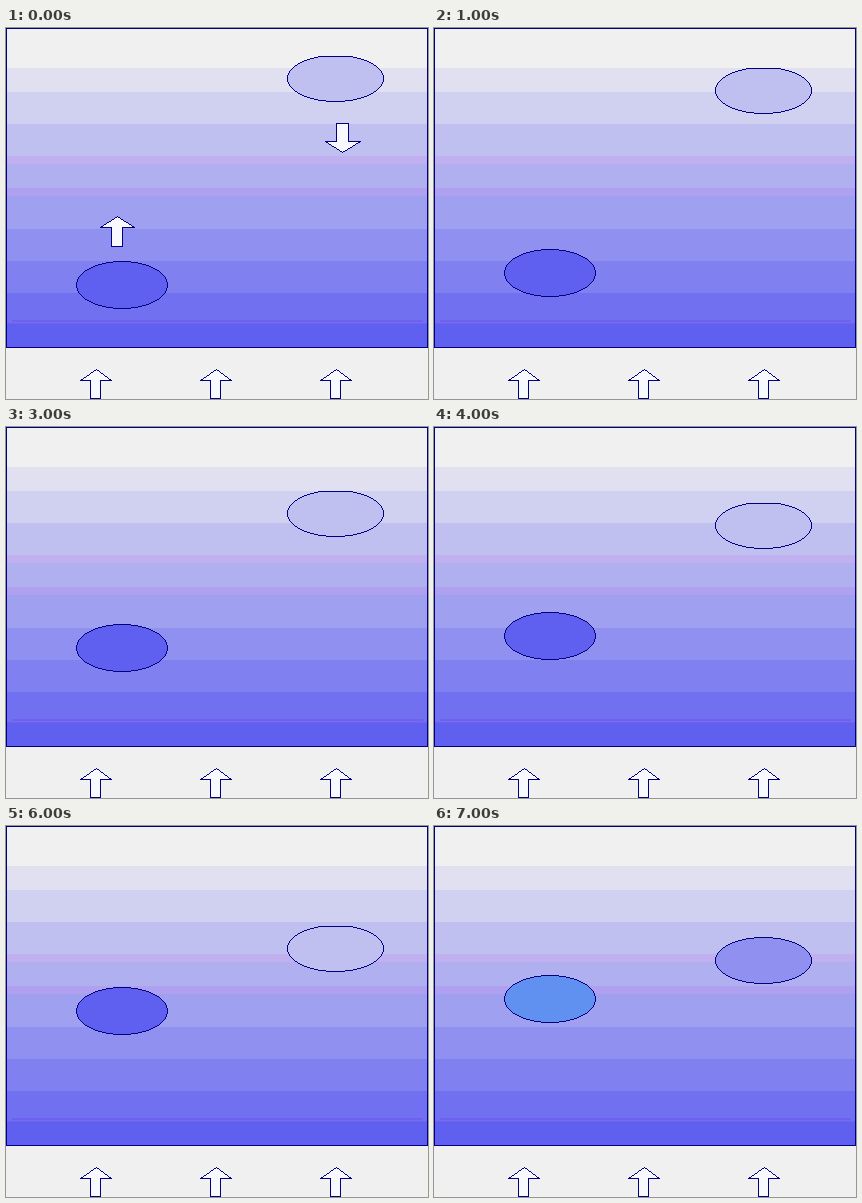
These frames come from a looping animation (422x371 px, 8000 ms). An HTML page with a canvas:

```html
<!DOCTYPE html>
<html lang="en">
<head>
<meta charset="utf-8">
<title>Rising and sinking parcels</title>
<style>
html, body { margin: 0; width: 100%; height: 100%; overflow: hidden; background: #f0f0f0; }
canvas { display: block; }
</style>
</head>
<body>
<canvas id="stage" width="422" height="371"></canvas>
<script>
const ctx = document.getElementById('stage').getContext('2d');
const LOOP = 8000, STEP = 1000, RISE = 12;
const INK = '#000080', PAPER = '#f0f0f0', WHITE = '#f8f8ff';

// Top edge and colour of each layer
const layers = [
  [0, PAPER], [40, '#e0e0f0'], [64, '#d0d0f0'], [96, '#c0c0f0'],
  [128, '#c0b0f0'], [136, '#b0b0f0'], [160, '#b0a0f0'], [168, '#a0a0f0'],
  [201, '#9090f0'], [233, '#8080f0'], [265, '#7070f0'], [296, '#6060f0']
];

function rect(x, y, w, h, color) {
  ctx.fillStyle = color;
  ctx.fillRect(x, y, w, h);
}

// Crisp one-pixel line
function line(x0, y0, x1, y1) {
  const n = Math.max(Math.abs(x1 - x0), Math.abs(y1 - y0));
  for (let i = 0; i <= n; i++) {
    rect(Math.round(x0 + (x1 - x0) * i / n), Math.round(y0 + (y1 - y0) * i / n), 1, 1, INK);
  }
}

function polygon(points, fill) {
  ctx.fillStyle = fill;
  ctx.beginPath();
  points.forEach(([x, y]) => ctx.lineTo(x + 0.5, y + 0.5));
  ctx.fill();
  points.forEach(([x, y], i) => line(x, y, ...points[(i + 1) % points.length]));
}

// dir is 1 for an arrow pointing up, -1 for down
function arrow(x, tip, dir, left, right, stemLeft, stemRight, head, length) {
  const neck = tip + dir * head, end = tip + dir * length;
  polygon([
    [x, tip], [x + right, neck], [x + stemRight, neck], [x + stemRight, end],
    [x - stemLeft, end], [x - stemLeft, neck], [x - left, neck]
  ], WHITE);
}

// Crisp ellipse inside inclusive pixel bounds; rows above minY collapse onto it
function ellipse(left, top, right, bottom, fill, minY = top) {
  const cx = (left + right) / 2, cy = (top + bottom) / 2;
  const rx = (right - left) / 2, ry = (bottom - top) / 2;
  const spanX = y => rx * Math.sqrt(Math.max(0, 1 - ((y - cy) / ry) ** 2));
  const spanY = x => ry * Math.sqrt(Math.max(0, 1 - ((x - cx) / rx) ** 2));
  for (let y = minY; y <= bottom; y++) {
    const a = Math.round(cx - spanX(y)), b = Math.round(cx + spanX(y));
    rect(a, y, b - a + 1, 1, fill);
  }
  for (let y = minY + 1; y < bottom; y++) {
    if (Math.abs(y - cy) > ry * 0.9) continue;
    rect(Math.round(cx - spanX(y)), y, 1, 1, INK);
    rect(Math.round(cx + spanX(y)), y, 1, 1, INK);
  }
  for (let x = left + 1; x < right; x++) {
    if (Math.abs(x - cx) > rx * 0.97) continue;
    rect(x, Math.max(minY, Math.round(cy - spanY(x))), 1, 1, INK);
    rect(x, Math.round(cy + spanY(x)), 1, 1, INK);
  }
}

function drawBackground() {
  rect(0, 0, 422, 371, PAPER);
  layers.forEach(([y, color], i) => {
    const next = i + 1 < layers.length ? layers[i + 1][0] : 319;
    rect(0, y, 422, next - y, color);
  });
  rect(6, 292, 411, 2, '#7060f0');
  rect(1, 295, 420, 1, '#7060f0');
  rect(0, 0, 422, 1, INK);
  rect(0, 319, 422, 1, INK);
  rect(0, 0, 1, 320, INK);
  rect(421, 0, 1, 320, INK);
  for (const x of [90, 210, 330]) arrow(x, 341, 1, 16, 15, 6, 4, 11, 29);
}

function draw(time) {
  const step = Math.floor((time % LOOP) / STEP);
  const shift = step * RISE, last = step === 7;
  drawBackground();
  ellipse(70, 233 - shift, 161, 280 - shift, last ? '#6090f0' : '#6060f0');
  const top = 27 + shift;
  ellipse(281, top, 377, top + 46, last ? '#9090f0' : '#c0c0f0', last ? top : top + 1);
  if (step === 0) {
    arrow(111, 188, 1, 17, 17, 6, 5, 11, 30);
    arrow(336, 124, -1, 17, 18, 6, 6, 11, 29);
  }
}

let start;
function tick(now) {
  start ??= now;
  draw(now - start);
  requestAnimationFrame(tick);
}
draw(0);
requestAnimationFrame(tick);
</script>
</body>
</html>
```
